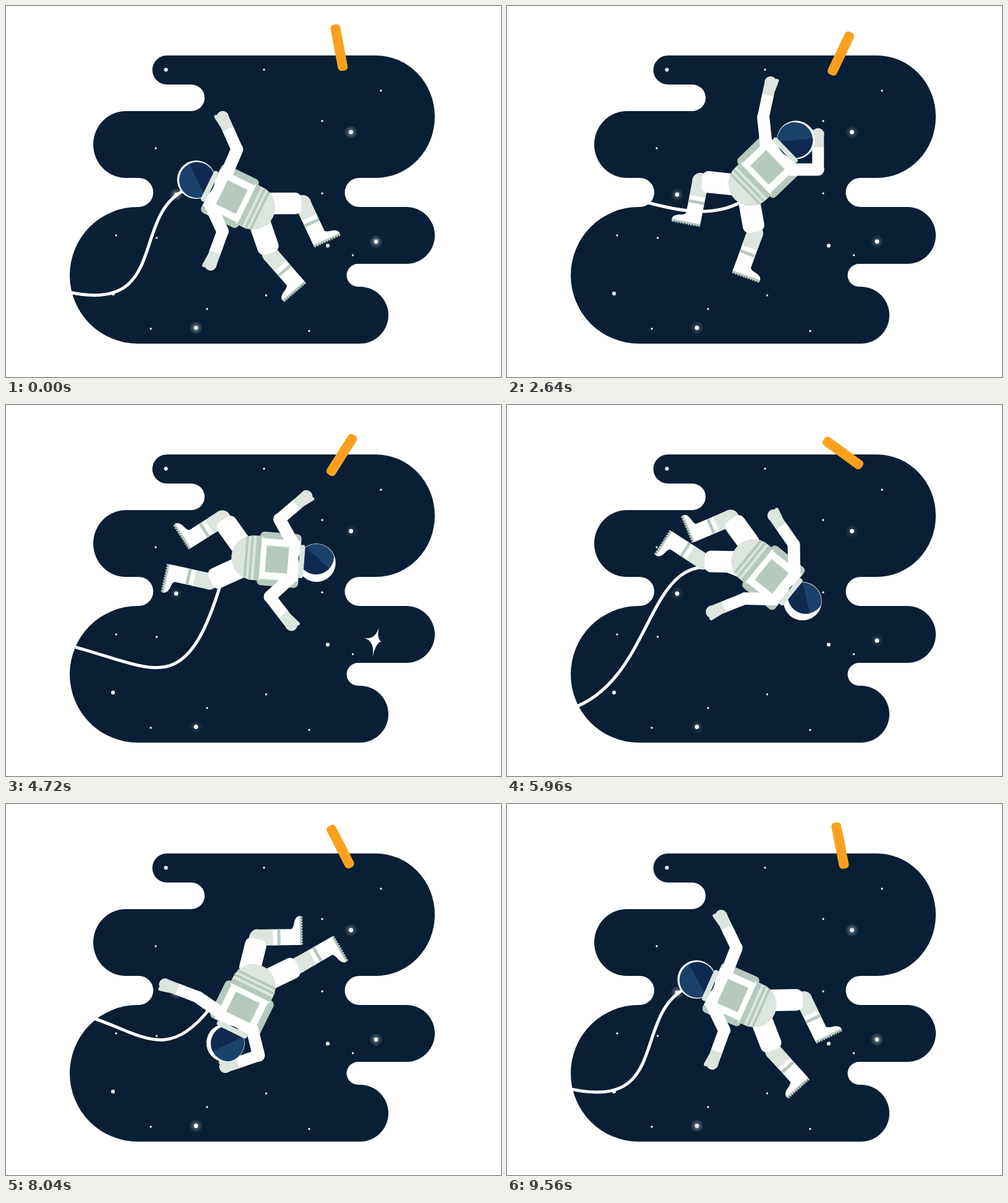
An HTML page with a canvas for the animation above (9600 ms loop, 800 px wide and 600 px high).

```html
<!DOCTYPE html>
<html lang="en">
<head>
<meta charset="utf-8">
<title>Astronaut</title>
<style>
  html, body { margin: 0; width: 100%; height: 100%; overflow: hidden; background: #fff; }
  canvas { display: block; }
</style>
</head>
<body>
<canvas id="stage" width="800" height="600"></canvas>
<script>
const ctx = document.getElementById('stage').getContext('2d');
const LOOP = 9600, TAU = Math.PI * 2, RAD = Math.PI / 180;
const WHITE = '#fff', LIGHT = '#dce5de', GREEN = '#b5c9bd', SPACE = '#091f35';

const cloud = new Path2D(`M260 80H598A95 99 0 0 1 598 278H571A23.5 23.5 0 0 0 571 325
  H647A46 46 0 0 1 647 417H569A18.5 18.5 0 0 0 569 454H572A46 46 0 0 1 572 546
  H213A110 110.5 0 0 1 213 325H214.5A23.5 23.5 0 0 0 214.5 278H194A53 54 0 0 1 194 170
  H299.5A21.5 21.5 0 0 0 299.5 127H260A23.5 23.5 0 0 1 260 80Z`);
const boot = new Path2D('M34 -13H55C58 -15 59 -20 60 -25C62 -31 65 -34 69 -34V13H34Z');

const smallStars = [[417, 103], [606, 137], [511, 186], [242, 230], [511, 303], [178, 371],
  [243.5, 375], [560.5, 403], [420.5, 468], [325, 490], [234, 522], [490, 525.5]];
const bigStars = [[258.5, 103], [520, 387.5], [173, 465]];
const glowStars = [[557.5, 204], [275, 305], [598, 381], [307, 520.5]];

// x, y, turn | right upper arm, forearm | left | right thigh, shin | left | visor shift
const poseTimes = [0, 1200, 2640, 4720, 5960, 8040];
const poses = [
  [365, 309, -64,   -3, -50, 129, 174,   64, 129, 135, 113,   0],
  [389, 282, -8,   -32, -34, 149, 181,   24, 72, 123, 56,    10],
  [421, 261, 46,   -46, -136, 218, 236,  34, 64, 140, 55,    -1],
  [438, 250, 94.5,  43, -42, 146, 225,   61, 98, 140, 53,   -10],
  [428, 277, 129,   52, 29, 140, 106,    52, 84, 105, 28,   -10],
  [383, 329, 206,    9, -5, 230, 315,    78, 153, 128, 124,  -5]
];
// Bezier points of the tether at the same times
const tethers = [
  [98, 462, 265, 500, 200, 340, 290, 297],
  [100, 480, 200, 385, 205, 228, 354, 304],
  [95, 285, 200, 300, 300, 360, 378, 317],
  [103, 389, 240, 425, 290, 480, 348, 286],
  [104, 491, 250, 440, 220, 200, 376, 277],
  [115, 338, 215, 365, 255, 425, 331, 329]
];

// Periodic cubic interpolation; the turn column gains 360 degrees per loop
function sample(rows, t, turnColumn = -1) {
  const n = rows.length;
  const i = poseTimes.findLastIndex(time => time <= t);
  const time = k => poseTimes[(k + n) % n] + Math.floor(k / n) * LOOP;
  const h = time(i + 1) - time(i), u = (t - time(i)) / h;
  return rows[0].map((_, c) => {
    const v = k => rows[(k + n) % n][c] + (c === turnColumn ? 360 * Math.floor(k / n) : 0);
    const slope = k => (v(k + 1) - v(k - 1)) / (time(k + 1) - time(k - 1)) * h;
    const a = v(i), b = v(i + 1), p = slope(i), q = slope(i + 1);
    return a + u * (p + u * (3 * (b - a) - 2 * p - q + u * (2 * (a - b) + p + q)));
  });
}

function at(x, y, degrees, draw) {
  ctx.save();
  ctx.translate(x, y);
  ctx.rotate(degrees * RAD);
  draw();
  ctx.restore();
}
function disc(x, y, r, color) {
  ctx.fillStyle = color;
  ctx.beginPath();
  ctx.arc(x, y, r, 0, TAU);
  ctx.fill();
}
function box(x, y, w, h, color, r = 0) {
  ctx.fillStyle = color;
  ctx.beginPath();
  ctx.roundRect(x, y, w, h, r);
  ctx.fill();
}
function line(x1, y1, x2, y2, width, color, cap = 'round') {
  ctx.strokeStyle = color;
  ctx.lineWidth = width;
  ctx.lineCap = cap;
  ctx.beginPath();
  ctx.moveTo(x1, y1);
  ctx.lineTo(x2, y2);
  ctx.stroke();
}

function arm(side, upper, fore) {
  at(28 * side, -24, upper, () => {
    line(0, 0, 45, 0, 20, WHITE);
    at(45, 0, fore - upper, () => {
      ctx.scale(1, side);
      line(0, 0, 28, 0, 19, WHITE);
      box(26, -9.5, 11, 19, WHITE);
      box(36, -9.5, 18, 19, LIGHT);
      disc(57, 0, 10, LIGHT);
      line(46, -7, 62, -9.5, 6, LIGHT);
    });
  });
}

function leg(side, thigh, shin) {
  at(17 * side, 58, thigh, () => {
    at(55, 0, shin - thigh, () => {
      ctx.scale(1, side);
      disc(0, 0, 13.5, LIGHT);
      box(0, -13.2, 26, 26.4, LIGHT);
      box(25, -13, 10, 26, WHITE);
      ctx.fillStyle = WHITE;
      ctx.fill(boot);
      box(32, -13, 5, 26, GREEN);
      box(68.5, -34, 3, 47, GREEN, 1);
      ctx.setLineDash([2.5, 1.8]);
      line(72, -33, 72, 12.5, 2.4, GREEN, 'butt');
    });
    box(-6, -17.5, 59, 35, WHITE, 10);
  });
}

function helmet(shift) {
  at(0, -64, 0, () => {
    disc(0, 0, 31, WHITE);
    ctx.beginPath();
    ctx.arc(0, 0, 30.3, 0, TAU);
    ctx.clip();
    disc(shift, 1.5, 29, '#1b426b');
    ctx.fillStyle = '#0f2a50';
    ctx.beginPath();
    ctx.arc(shift, 1.5, 29, -52 * RAD, 128 * RAD);
    ctx.fill();
  });
  box(-27, -44, 54, 8.5, LIGHT, 4);
}

function astronaut(t) {
  const [x, y, turn, ru, rf, lu, lf, rt, rs, lt, ls, visor] = sample(poses, t, 2);
  at(x, y, turn, () => {
    leg(1, rt, rs);
    leg(-1, lt, ls);
    box(-43.5, -37, 87, 67, GREEN, 7);
    box(-36, 24, 72, 50, LIGHT, [0, 0, 36, 36]);
    box(-36, 27, 72, 8.5, GREEN);
    box(-36, 40, 72, 4, GREEN);
    box(-34, 48, 68, 4, GREEN);
    box(-33, -36, 66, 63, WHITE);
    arm(1, ru, rf);
    arm(-1, lu, lf);
    box(-21.5, -18, 43, 36, GREEN);
    helmet(visor);
  });
}

function tether(t) {
  const [x, y, ...curve] = sample(tethers, t);
  ctx.strokeStyle = WHITE;
  ctx.lineWidth = 5;
  ctx.lineCap = 'round';
  ctx.beginPath();
  ctx.moveTo(x, y);
  ctx.bezierCurveTo(...curve);
  ctx.stroke();
}

function sparkle(x, y, size) {
  at(x, y, 12, () => {
    ctx.scale(size, size);
    ctx.fillStyle = WHITE;
    ctx.beginPath();
    ctx.moveTo(0, -22);
    ctx.quadraticCurveTo(1, -1, 9, 0);
    ctx.quadraticCurveTo(1, 1, 0, 27);
    ctx.quadraticCurveTo(-1, 1, -20, 0);
    ctx.quadraticCurveTo(-1, -1, 0, -22);
    ctx.fill();
  });
}

function stars(t) {
  const glow = 0.5 + 0.5 * Math.cos(TAU * t / LOOP);
  const flash = t > 4300 && t < 5140 ? Math.sin(Math.PI * (t - 4300) / 840) : 0;
  for (const [x, y] of smallStars) disc(x, y, 1.7, '#eef1f4');
  for (const [x, y] of bigStars) disc(x, y, 3.1, WHITE);
  for (const [x, y] of glowStars) {
    const halo = ctx.createRadialGradient(x, y, 2, x, y, 11);
    halo.addColorStop(0, `rgba(255,255,255,${0.12 + 0.25 * glow})`);
    halo.addColorStop(1, 'rgba(255,255,255,0)');
    disc(x, y, 11, halo);
    disc(x, y, 3.4, glow > 0.9 ? '#e4e8ec' : WHITE);
  }
  if (flash) sparkle(598, 381, flash);
}

function trophy(t) {
  const u = Math.min(1, Math.max(0, (t - 2200) / 4100));
  const turn = -10.7 + 101 * t / LOOP + 259 * u * u * (3 - 2 * u);
  const x = 540.5 - 2.5 * Math.cos(TAU * (t - 800) / LOOP);
  const y = 74 - 7 * Math.cos(TAU * (t + 400) / LOOP);
  at(x, y, turn, () => box(-8, -38, 16, 76, '#f9a11f', 6));
}

function frame(now) {
  const t = now % LOOP;
  ctx.fillStyle = WHITE;
  ctx.fillRect(0, 0, 800, 600);
  ctx.fillStyle = SPACE;
  ctx.fill(cloud);
  stars(t);
  tether(t);
  astronaut(t);
  trophy(t);
  requestAnimationFrame(() => frame(performance.now() - start));
}
const start = performance.now();
frame(0);
</script>
</body>
</html>
```
